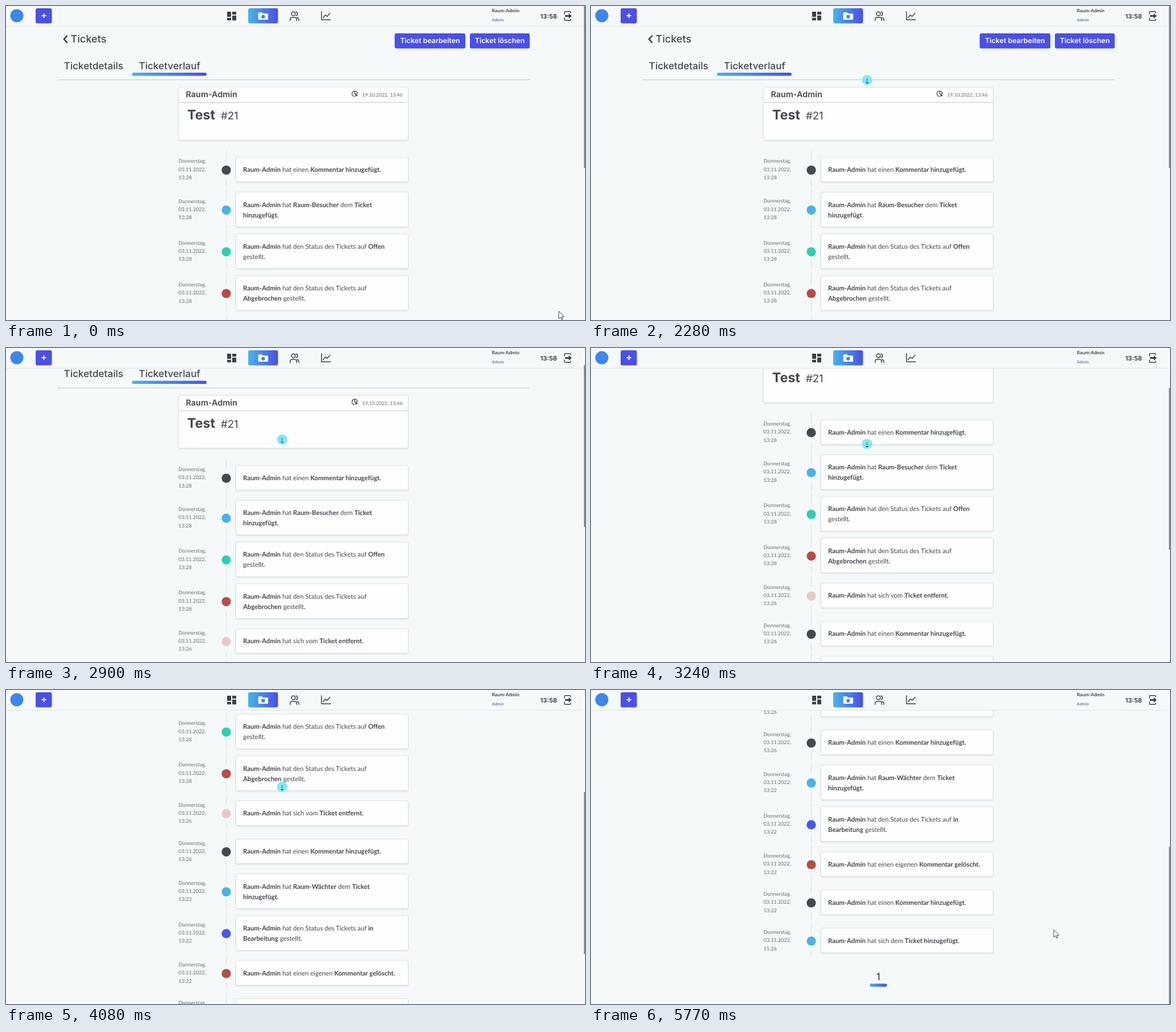
Write an HTML page that moves like this. It is 1016 px wide and 551 px high and loops after 5.83 s.

```html
<!DOCTYPE html>
<html lang="de">
<head>
<meta charset="utf-8">
<title>Ticketverlauf</title>
<style>
  html, body { margin: 0; width: 100%; height: 100%; overflow: hidden; background: #f5f9fa; }
  svg { display: block; width: 1016px; height: 551px; }
  text { white-space: pre; fill: #43474d; text-rendering: geometricPrecision; }
  .head { font-family: Inter, "Open Sans", sans-serif; }
  .body { font-family: Lato, "Open Sans", sans-serif; }
  .small { font-size: 9px; fill: #666b71; }
  .line { fill: none; stroke: #3b4047; stroke-width: 1.5; stroke-linecap: round; stroke-linejoin: round; }
  .card { fill: #fefefe; stroke: #dfe3e5; }
</style>
</head>
<body>
<svg viewBox="0 0 1016 551">
  <defs>
    <linearGradient id="accent">
      <stop offset="0" stop-color="#49b4e9"/>
      <stop offset="1" stop-color="#4a4fe6"/>
    </linearGradient>
    <filter id="shadow" x="-5%" y="-20%" width="110%" height="150%">
      <feDropShadow dx="0" dy="1" stdDeviation="1" flood-color="#56636b" flood-opacity=".22"/>
    </filter>
  </defs>
  <rect width="1016" height="551" fill="#f5f9fa"/>

  <g id="page">
    <path class="line" d="M107 52.5L101.7 58.2L107 64" style="stroke-width:2.5"/>
    <g class="head" font-weight="500">
      <text x="113.5" y="64.3" font-size="18">Tickets</text>
      <text x="101.5" y="110.7" font-size="17.1">Ticketdetails</text>
      <text x="233" y="110.7" font-size="17.1">Ticketverlauf</text>
    </g>
    <rect x="221" y="117" width="131" height="5.5" rx="2.7" fill="url(#accent)"/>
    <path d="M90 129.5H919" stroke="#c3c8cb"/>
    <g fill="#4a50e7">
      <rect x="682" y="48" width="124" height="26.5" rx="3"/>
      <rect x="814" y="48" width="105" height="26.5" rx="3"/>
    </g>
    <g class="head" font-size="12.4" font-weight="600" text-anchor="middle">
      <text x="744" y="65.3" style="fill:#fff">Ticket bearbeiten</text>
      <text x="866.5" y="65.3" style="fill:#fff">Ticket löschen</text>
    </g>

    <rect class="card" x="303" y="142.5" width="402.5" height="92.5" rx="2" filter="url(#shadow)"/>
    <path d="M303 169.3H705.5" stroke="#d5d9db" stroke-width="1.5"/>
    <g class="head">
      <text x="315.5" y="160" font-size="14.4" font-weight="600">Raum-Admin</text>
      <text x="318" y="199.3" font-size="23.2" font-weight="700">Test</text>
      <text x="377" y="199.3" font-size="18.6">#21</text>
    </g>
    <g class="line" style="stroke-width:1.2">
      <path d="M616.6 153.4A4.7 4.7 0 1 0 611.2 158.6M612 149.5V154H616.5"/>
      <path d="M613.2 154.2L617.6 156.7L613.2 159.2Z" fill="#3b4047" stroke="none"/>
    </g>
    <text class="body small" x="625" y="159" style="font-size:8.7px">19.10.2022, 13:46</text>

    <g id="rows"></g>
    <text class="head" x="504" y="1057.5" font-size="17" font-weight="500" text-anchor="middle">1</text>
    <rect x="489" y="1063.8" width="30.5" height="5.5" rx="2.7" fill="url(#accent)"/>
  </g>

  <rect width="1014" height="35" fill="#f6f9fa"/>
  <path d="M0 35.5H1014" stroke="#dde2e4"/>
  <circle cx="19" cy="17" r="11.5" fill="#3f86ea"/>
  <rect x="52" y="4" width="28.5" height="26.5" rx="3" fill="#4a50e7"/>
  <path d="M62.5 17H70.5M66.5 13V21" stroke="#fff" stroke-width="2"/>
  <path d="M388 10h7v9h-7zM397 10h7v5h-7zM388 20.7h7v4.6h-7zM397 16.7h7v8.6h-7z" fill="#3b4047"/>
  <rect x="425" y="4" width="52.3" height="26.5" rx="3" fill="url(#accent)"/>
  <path d="M444 11.3h5.2l2 2h7.4q1.4 0 1.4 1.4v8q0 1.4-1.4 1.4H444q-1.4 0-1.4-1.4v-10q0-1.4 1.4-1.4z" fill="#fff"/>
  <circle cx="451.3" cy="18.8" r="3.2" fill="#4b80e8"/>
  <g class="line">
    <circle cx="504.3" cy="13.6" r="3.4"/>
    <path d="M498.6 25.5V23.7Q498.6 20 502.3 20H506.3Q510 20 510 23.7V25.5M509 10.3A3.4 3.4 0 0 1 509 16.9M510.8 20.2Q513.8 21 513.8 24V25.5"/>
    <path d="M553.6 10V24.3H569.5M556.5 20.3L560.5 15.7L563.5 18.3L568.5 12.7"/>
    <path d="M980 14V11Q980 9.7 981.3 9.7H989.5Q990.8 9.7 990.8 11V12M990.8 23V24Q990.8 25.3 989.5 25.3H981.3Q980 25.3 980 24V21"/>
  </g>
  <path d="M981 16h6.5v-3.2l5.2 4.7l-5.2 4.7v-3.2H981z" fill="#3b4047"/>
  <g class="body">
    <text x="852.5" y="10.6" font-size="8.3" font-weight="700">Raum-Admin</text>
    <text x="852.5" y="26.8" font-size="7.4" style="fill:#35608f">Admin</text>
  </g>
  <text class="head" x="937.5" y="21.6" font-size="11" font-weight="700">13:58</text>

  <rect x="1013.5" width="2.5" height="551" fill="#fafcfc"/>
  <rect id="thumb" x="1014" width="3" height="284.5" rx="1.5" fill="#8b8d8f"/>

  <g id="arrow">
    <path d="M0 0V13.3L3 10.6L5.1 15L7 14.1L5 9.8H9.2Z" fill="#fff" stroke="#2b2d30" stroke-width=".9" stroke-linejoin="round"/>
  </g>
  <g id="disc">
    <circle r="9" fill="#74e8f8" fill-opacity=".93"/>
    <circle cy="-1.4" r="1" fill="#24434a"/>
    <circle cy="1.4" r=".9" fill="#24434a"/>
    <path d="M-2.8 3.8H2.8L0 6.4Z" fill="#24434a"/>
  </g>
</svg>
<script>
const LOOP = 5830;
const byId = id => document.getElementById(id);
const dark = '#45484f', blue = '#4bb1e8', green = '#2dd0b0', red = '#b94c45', rose = '#e8c9c7', indigo = '#4a58e6';

// Asterisks enclose bold text; each further string is a new line.
const me = '*Raum-Admin* hat ';
const comment = me + 'einen *Kommentar hinzugefügt.*';
const entries = [
  ['13:28', dark, comment],
  ['13:28', blue, me + '*Raum-Besucher* dem *Ticket*', '*hinzugefügt.*'],
  ['13:28', green, me + 'den Status des Tickets auf *Offen*', 'gestellt*.*'],
  ['13:28', red, me + 'den Status des Tickets auf', '*Abgebrochen* gestellt*.*'],
  ['13:26', rose, me + 'sich vom *Ticket entfernt.*'],
  ['13:26', dark, comment],
  ['13:22', blue, me + '*Raum-Wächter* dem *Ticket*', '*hinzugefügt.*'],
  ['13:22', indigo, me + 'den Status des Tickets auf *in*', '*Bearbeitung* gestellt*.*'],
  ['13:22', red, me + 'einen eigenen *Kommentar gelöscht.*'],
  ['13:22', dark, comment],
  ['11:26', blue, me + 'sich dem *Ticket hinzugefügt.*']
];

const rich = line => line.split('*').map((part, i) =>
  i % 2 ? `<tspan font-weight="700">${part}</tspan>` : part).join('');

function buildRows() {
  let top = 253.4, html = '';
  for (const [time, color, ...lines] of entries) {
    const double = lines.length > 1;
    const height = double ? 73.2 : 67;
    const mid = top + height / 2;
    const cardHeight = double ? 60.5 : 43;
    const dates = ['Donnerstag,', '03.11.2022,', time].map((s, i) =>
      `<text class="small" x="302.8" y="${mid - 11.5 + i * 14.3}">${s}</text>`).join('');
    const message = lines.map((line, i) =>
      `<text x="416" y="${mid + (double ? -4.4 : 4.3) + i * 18}" font-size="11.33">${rich(line)}</text>`).join('');
    html += `<path d="M386.5 ${top}V${mid - 15}M386.5 ${mid + 17}V${top + height - 3}" stroke="#dce0e2"/>
      <circle cx="386.5" cy="${mid + 1.1}" r="8.1" fill="${color}"/>
      <rect class="card" x="403.5" y="${mid - cardHeight / 2}" width="302" height="${cardHeight}" rx="2" filter="url(#shadow)"/>
      ${dates}${message}`;
    top += height;
  }
  byId('rows').innerHTML = `<g class="body">${html}</g>`;
}

// Runs of screen updates: start, end, number of steps.
const runs = [
  [70, 600, 9], [670, 1200, 9], [1260, 1400, 3], [1600, 1740, 3], [1940, 1940, 1],
  [2140, 2700, 9], [2760, 3320, 9], [3390, 3940, 9], [4010, 4570, 9],
  [4640, 4850, 4], [5170, 5700, 9], [5770, 5770, 1]
];

function lastUpdate(t) {
  const slack = 12;
  let shown = 0;
  for (const [start, end, steps] of runs) {
    if (t < start) break;
    const gap = (end - start) / (steps - 1) || 1;
    const step = Math.min(steps - 1, Math.floor((t - start + slack) / gap));
    shown = Math.min(t, start + step * gap);
  }
  return shown;
}

// Keys: time, x, y and the easing exponent of the way to that key.
const arrowKeys = [
  [0, 970, 535.5], [600, 697, 151.5, .85], [1200, 538.5, 118.5], [1400, 418.5, 103.5],
  [1540, 418.5, 103.5], [1740, 484.5, 119.5], [5170, 484.5, 170],
  [5700, 768.5, 374.5, 1.3], [5770, 812, 420.5]
];
const discKeys = [
  [1940, 484.5, 121], [2140, 484.5, 121], [2630, 484.5, 152.5], [3140, 484.5, 168], [4570, 484.5, 171]
];

function along(keys, t) {
  const i = keys.findIndex(key => key[0] > t);
  if (i < 0) return keys[keys.length - 1].slice(1, 3);
  if (i === 0) return keys[0].slice(1, 3);
  const [t0, x0, y0] = keys[i - 1], [t1, x1, y1, power = 1] = keys[i];
  const p = ((t - t0) / (t1 - t0)) ** power;
  return [x0 + (x1 - x0) * p, y0 + (y1 - y0) * p];
}

// Speed rises evenly, stays constant, and stops at the page end.
function scrollAt(t) {
  const start = 2268, full = 3142, speed = .26, end = 548.5;
  if (t < start || t >= 5170) return t < start ? 0 : end;
  const ramp = full - start;
  const s = t < full ? speed * (t - start) ** 2 / (2 * ramp) : speed * (t - start - ramp / 2);
  return Math.min(end, s);
}

const place = (el, x, y) => el.setAttribute('transform', `translate(${x} ${y})`);
const page = byId('page'), thumb = byId('thumb'), arrow = byId('arrow'), disc = byId('disc');

function render(time) {
  const t = lastUpdate(time);
  const scroll = scrollAt(t);
  const scrolling = t >= 1940 && t < 5170;
  place(page, 0, -scroll);
  thumb.setAttribute('y', scroll * .5);
  arrow.style.display = scrolling ? 'none' : '';
  disc.style.display = scrolling ? '' : 'none';
  place(arrow, ...along(arrowKeys, t));
  place(disc, ...along(discKeys, t));
}

buildRows();
const begin = performance.now();
function tick() {
  render((performance.now() - begin) % LOOP);
  requestAnimationFrame(tick);
}
tick();
</script>
</body>
</html>
```
